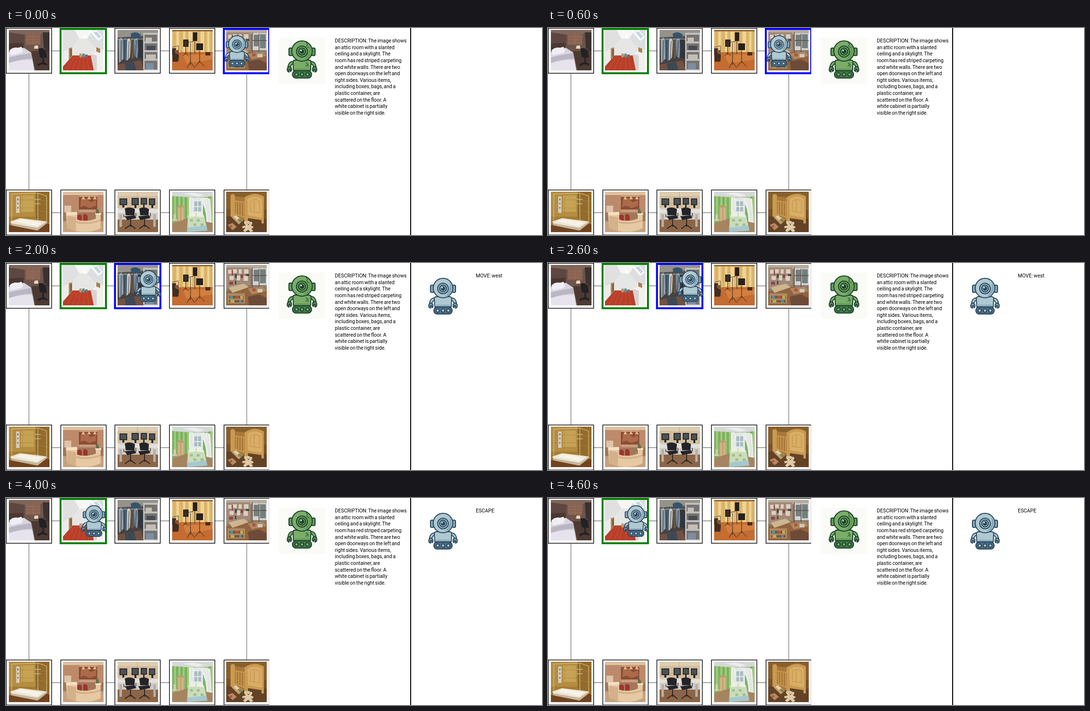
An HTML page for the animation above (5 s loop, 1110x430 px).

```html
<!DOCTYPE html>
<html lang="en">
<head>
<meta charset="utf-8">
<title>Room navigation</title>
<style>
  html, body { margin: 0; width: 100%; height: 100%; overflow: hidden; background: #fff; }
  svg { display: block; width: 1110px; height: 430px; }
  svg svg { width: 84px; height: 84px; }
  text { font: 10.4px Roboto, "Liberation Sans", sans-serif; word-spacing: -.9px; fill: #000; }
</style>
</head>
<body>
<svg id="stage" viewBox="0 0 1110 430"></svg>
<script>
const STEP = 1000;
const PITCH = 112.7;

// One shape per line: "color path" is a fill, "- color width path" is a line.
const ROOMS = {
  bedroom: `
#6d554b M0 0H84V84H0Z
#5d4740 M0 5L32 9V38H0Z
#80665a M0 0H84V7L34 10 0 5Z
#8a6352 M35 8H65V31H35Z
- #a07a69 .6 M35 14H65M35 20H65M35 26H65M50 8V31
#4a3731 M0 28L30 27V40L0 46Z
#3a3230 M70 5H84V48H73Z
#6f5142 M50 39H76V44H50Z
#4c3a32 M46 44H84V84H55Z
#222126 M61 39Q70 35 76 43L79 58 64 57ZM69 57H72L73 72H70ZM59 71L71 66 80 71 79 74 70 71 60 75Z
#d8d5de M0 46L31 37 46 47 53 84H0Z
#bbb6c4 M0 57Q26 51 46 48L48 60Q25 60 0 69Z
#f0eef4 M1 43Q8 35 19 37L26 35Q32 43 26 48L4 53Z
#e6e3ec M0 69Q25 61 49 63L52 84H0Z
#e8d9bc M53 33L60 32 61 39H52Z`,
  attic: `
#ececeb M0 0H84V84H0Z
#f6f6f5 M24 0H60L62 22 48 30 22 28Z
#e0e0e0 M0 0H24L34 18 18 36 0 45Z
#e6e6e4 M18 36L33 18H50L66 36V54H18Z
#dcdee0 M50 18L62 0H84V42L66 36Z
#f8fcff M57 4L70 0 82 15 73 23Z
#c6d6de M63 5L70 3 79 14 74 18Z
#b18a55 M12 38L19 36V54L12 62Z
#7d5a3b M15 40L18 39V54L15 57Z
#a9804f M69 36L77 39V50L69 48Z
#b93f29 M20 53H61L66 84H0V76Z
- #cc5b41 .8 M25 54L7 84M31 54L19 84M37 54L31 84M43 54L43 84M49 54L54 84
#f1f0ed M57 50L70 45 84 51V84H64Z
#d6d3d0 M57 50L70 53V84H64Z
#b79a75 M34 49H39V57H34Z
#5f9191 M40 49H45V57H40Z
#66737f M46 51H51V57H46Z
#fff M42 10H47V17H42Z`,
  closet: `
#5d5856 M0 0H84V84H0Z
#96918b M0 0H84V8L50 12 0 16Z
#46413f M0 16H54V84H0Z
#bfbfbb M53 6H84V84H53Z
#77736f M56 10H82V24H56ZM56 28H82V42H56ZM56 46H82V60H56ZM56 64H82V82H56Z
#34536d M27 8Q38 1 48 10L44 18 29 17Z
#93a1ac M2 20L8 16 13 24 12 60 3 69Z
#4a6376 M11 20L18 16 22 24 19 65 12 60Z
#cfcfcb M20 20L24 17 28 24 25 58 19 64Z
#6b5b4b M27 20L31 17 35 24 33 60 26 56Z
#7d91a4 M34 20L40 17 44 25 41 59 35 54Z
#31353e M42 20L48 17 53 25V61L43 57Z
- #2f2d2f 1 M8 22L7 64M15 22L14 61M24 23L22 60M31 22L29 57M39 22L37 55
- #cfcac2 1 M0 19H54
#c4beb6 M58 16H71V24H58ZM59 51H79V60H59Z
#484b52 M60 33H78V42H60Z
#7d8ea3 M59 69H75V82H59Z
#705142 M0 72L48 63 54 84H0Z
#3d4856 M15 70L34 66 39 84H17Z`,
  studio: `
#dfb970 M0 0H84V84H0Z
#efd595 M9 2H14V49H9ZM23 2H27V49H23ZM34 2H41V49H34ZM59 2H66V49H59ZM73 2H77V49H73Z
- #c59c54 .8 M5 3V47M19 3V47M31 3V48M55 3V48M69 3V48M81 3V48
#9a6534 M0 0H84V3H0Z
#c46c31 M0 48L22 46H84V84H0Z
#d27f40 M22 52L84 50V61L30 70Z
#28201c M43 5H52V23H43ZM23 20H34V35H23ZM50 28H64V42H50Z
#3a3028 M25 22H32V33H25Z
- #30241d 1 M28 35V51M47 23V50M57 43V69M38 27V73M32 26L44 24M48 76L57 65 67 76M31 79L38 66 47 79M22 54L28 48 34 54
#3e3027 M0 38H8V52H0ZM1 51Q9 45 14 53L12 66H1Z
#89532f M6 42H13V48H6Z
- #2b211b .8 M0 36L13 33M13 33V65
#4a2c1e M69 46H79V53H69Z`,
  playroom: `
#8f7a69 M0 0H84V84H0Z
#b8ab9c M0 0H84V7L52 9 0 5Z
#a18a78 M0 5H50V42L0 50Z
#cfd3d2 M54 7H84V42H54Z
#75807e M57 10H67V34H57ZM70 9H82V38H70Z
- #604b40 1.5 M54 5V48M68 8V47M84 22H55
#dccfc0 M4 10H11V18H4ZM14 9H22V17H14ZM26 9H32V18H26ZM37 9H46V18H37ZM7 23H16V31H7ZM22 22H29V32H22ZM36 23H45V33H36Z
#8d4742 M12 11H14V22H12ZM30 20H35V27H30ZM6 35H14V41H6Z
#414a52 M18 19H22V27H18ZM41 19H48V23H41ZM18 33H21V40H18Z
#92643f M0 55L43 45 84 51V84H0Z
#cdb68f M5 47L36 39 47 46 13 58Z
#ad8a60 M3 59H39V80H3ZM45 49L75 45 84 54 53 61Z
#6c5a4d M6 64H36V70H6ZM6 73H36V78H6Z
#5b8d95 M8 64H14V70H8ZM27 73H32V78H27Z
#b25342 M19 64H26V70H19ZM54 49H61V55H54Z
#c5aa49 M29 64H35V70H29ZM9 73H17V78H9Z
#6e4b38 M45 66L68 61 84 69V84H47Z
#d0c8ba M65 50H75V57H65Z`,
  shower: `
#a57c32 M0 0H84V84H0Z
#b58d40 M0 0H55V52H0Z
#956b28 M55 0H84V65L55 55Z
#c5a254 M25 8H52V42H25Z
- #ab8340 .7 M0 17H55M0 34H55M28 0V55M57 18L84 20M57 38L84 43
#d5cdbb M15 10H22V44H15Z
#898378 M17 14H20V18H17ZM17 23H20V26H17ZM17 32H20V35H17Z
- #d8cca5 1 M6 5V61M6 5L60 3M60 3V73M60 3L78 9M78 9V66
- #777053 .8 M58 4V72M64 5V70
#ece5d5 M3 62L23 55 79 62 59 78 6 69Z
#c4b69b M6 66L59 75 79 62V65L60 81 5 71Z
#f7f2e7 M13 62L25 57 69 64 58 72Z
#72431f M0 69L5 70 59 81 79 66 84 68V84H0Z
- #ded5bd 1 M53 16H66M53 25H66`,
  reception: `
#c79b7a M0 0H84V84H0Z
#dfc1a2 M0 0H84V7H0Z
#bd8a6b M0 7H34V43H0ZM71 7H84V55H71Z
#8a4d36 M33 11H71V37H33Z
#ad6a49 M37 17L48 14 58 22 68 17 69 29 55 34 44 29 36 32Z
#e3b78a M42 9L46 16H38ZM54 9L58 16H50ZM66 9L70 16H62Z
#dcc5a9 M3 29H17V44H3Z
#a2775a M0 43H84V61H0Z
#a0332e M30 49Q36 45 39 51V61H30ZM42 48Q48 44 51 51V60H42Z
#c8a17d M0 65H84V84H0Z
#e6c9a3 M6 45L29 44V58Q47 64 68 56V47H78V76Q56 87 28 82L9 76Z
#d3b18a M9 50L27 53V81L9 76ZM28 61Q50 67 78 58V61Q51 71 28 65Z
#f3e0c3 M6 43L29 42 30 48 8 49ZM67 44H79V48H67Z
#66704a M68 37Q70 31 74 39L75 45H68Z`,
  office: `
#d2bd9c M0 0H84V84H0Z
#decdb0 M0 0H84V9H0Z
- #b69e7a .8 M0 24H84M41 0V27
#8c6547 M0 56H84V84H0Z
#e4e0d9 M0 34L84 36V45H0Z
#d2cdc5 M0 44H84V58H0Z
#b5afa6 M4 47H9V73H4ZM74 47H79V73H74Z
#2b2c30 M4 14H20V28H4ZM29 13H44V28H29ZM48 13H61V27H48ZM65 14H78V28H65Z
#4d5256 M6 16H18V26H6ZM31 15H42V26H31ZM50 15H59V25H50ZM67 16H76V26H67Z
#292a2c M10 28H14V34H10ZM35 28H39V34H35ZM53 27H56V33H53ZM70 28H74V34H70Z
#d0cdc5 M3 33H22V37H3ZM52 34H71V37H52Z
#242428 M15 35Q25 30 36 36L35 49H17ZM15 51L35 49 39 55 20 59ZM45 35Q56 30 65 36L64 49H47ZM43 51L65 49 68 55 47 59Z
- #242326 1.8 M27 56V73M27 69L15 77M27 69L37 77M56 56V73M56 69L45 77M56 69L67 77
- #242326 1.2 M13 47V52H20M38 44V51H33M68 44V51H63`,
  green: `
#79b262 M0 0H84V84H0Z
#a3cb7b M4 8H8V59H4ZM13 8H17V58H13ZM22 8H26V56H22ZM31 8H35V55H31ZM71 8H75V63H71ZM80 8H84V67H80Z
#d5d9d7 M0 0H84V9L55 13 0 9Z
#ebeeeb M21 4L45 2 67 7 53 10Z
#e2e8e7 M37 13H64V48H37Z
#a9bcc0 M46 20H60V41H46Z
- #f4f6f6 1.4 M53 18V43M45 31H61
#ecedeb M35 12Q44 11 46 15Q45 35 35 47ZM57 14Q65 10 79 15L82 65 71 63Q71 34 57 14Z
- #cbd1cf .8 M40 14V38M66 15Q75 34 76 62M73 15L79 61
#bf9c6f M10 31Q17 25 25 31V66H10Z
#d2b284 M12 33H17V62H12ZM19 33H24V62H19Z
#a58560 M0 66L33 55 84 65V84H0Z
#cbdcbb M33 48Q47 41 66 49L72 76 31 81Z
#ecefe2 M36 45Q42 40 48 45L49 51 35 53ZM51 45Q58 41 64 47L66 53 51 52Z
#9bc28a M37 57H43V62H37ZM51 57H57V62H51ZM44 66H50V71H44ZM59 66H65V71H59Z
#a5c7cf M31 75L71 70 73 81 31 84Z
#d8c9ac M1 57H10V61H1ZM3 47H8V57H3Z`,
  nursery: `
#795329 M0 0H84V84H0Z
#87602f M0 0H84V37L42 42 0 35Z
#634325 M0 52L41 46 84 57V84H0Z
#a9793b M12 9L40 12V61L12 50Z
- #d1a356 1.4 M12 18L42 23M12 44L42 55M16 18V46M21 19V48M26 20V50M31 21V52M36 22V54
#c99a50 M9 7Q14 3 18 7V52H9ZM38 12Q58 -2 78 10V66H73V59L45 55V62H38Z
#d9ae66 M44 15Q59 5 74 15V54L45 49Z
- #b78444 .8 M50 20Q59 12 69 20V44L50 41ZM58 17V42
#c49f67 M11 53L20 48 35 60 26 68Z
#dfceb0 M15 52L20 49 27 55 22 59Z
#7d8458 M24 58L29 56 34 61 29 64Z
#b98763 M3 69L13 65 22 73 13 80Z
#a5523a M8 70H12V74H8Z
#e0caa6 M37 63Q38 59 41 62Q46 59 50 63Q54 61 54 66Q53 69 51 70L57 73 54 77 51 75 56 82 50 84 46 79 39 84 35 81 40 75 34 76 33 72 41 70Q37 67 37 63Z
#4b3324 M43 65H44V66H43ZM48 65H49V66H48ZM45 67H47V69H45Z`
};
const GRID = [
  ["bedroom", "attic", "closet", "studio", "playroom"],
  ["shower", "reception", "office", "green", "nursery"]
];
const DESCRIPTION = [
  "DESCRIPTION: The image shows", "an attic room with a slanted", "ceiling and a skylight. The",
  "room has red striped carpeting", "and white walls. There are two", "open doorways on the left and",
  "right sides. Various items,", "including boxes, bags, and a", "plastic container, are",
  "scattered on the floor. A", "white cabinet is partially", "visible on the right side."
];
const BLUE = { line: "#2a475e", light: "#afc9d2", mid: "#86a8b8", dark: "#4f6f85" };
const GREEN = { line: "#1b432c", light: "#7aad68", mid: "#659a58", dark: "#447a4a" };

const rect = (x, y, w, h, attrs) => `<rect x="${x}" y="${y}" width="${w}" height="${h}" ${attrs}/>`;
const circle = (x, y, r, attrs) => `<circle cx="${x}" cy="${y}" r="${r}" ${attrs}/>`;
const path = (d, attrs) => `<path d="${d}" ${attrs}/>`;
const label = (x, y, s, attrs = "") => `<text x="${x}" y="${y}" ${attrs}>${s}</text>`;

function shape(line) {
  const [, stroke, color, width, d] = line.match(/^(- )?(#\w+) (?:([\d.]+) )?(M.*)$/);
  return path(d, stroke ? `fill="none" stroke="${color}" stroke-width="${width}"` : `fill="${color}"`);
}

function card(name, col, row) {
  const x = col * PITCH, y = row * 336;
  const art = ROOMS[name].trim().split("\n").map(shape).join("");
  return rect(Math.round(x) + .5, y + .5, 94, 93.5, 'fill="#fff" stroke="#000" stroke-width="1.4"') +
    `<svg x="${Math.round(x + 5.6)}" y="${y + 4}" width="84" height="84">${art}</svg>`;
}

// Drawn around the middle of the head.
function robot(c, marks = "") {
  const edge = `stroke="${c.line}" stroke-width="2" stroke-linejoin="round"`;
  const arm = "M17 20Q24 20 25.5 29";
  const side = s => `<g transform="scale(${s} 1)">` +
    rect(19, -9, 7, 15, `rx="2.5" fill="${c.mid}" ${edge}`) +
    path(arm, `fill="none" stroke="${c.line}" stroke-width="7" stroke-linecap="round"`) +
    path(arm, `fill="none" stroke="${c.light}" stroke-width="3.4" stroke-linecap="round"`) +
    path("M21 36Q20 29 25 28Q31 30 29 37L26 39 26 34 24 33 23 38Z", `fill="${c.mid}" ${edge}`) +
    "</g>";
  return side(-1) + side(1) +
    path("M-14 15H14Q18 15 18 20L17 36H-17L-18 20Q-18 15 -14 15Z", `fill="${c.light}" ${edge}`) +
    path("M-14 33H14", `stroke="${c.mid}" stroke-width="2.4"`) +
    circle(0, -3, 20.3, `fill="${c.light}" ${edge}`) +
    path("M13 -17Q22 -5 14 9Q9 14 2 15Q17 6 13 -17Z", `fill="${c.mid}"`) +
    circle(0, -2, 11, `fill="${c.light}" ${edge}`) +
    circle(0, -2, 7.2, `fill="${c.mid}" ${edge}`) +
    circle(0, -2, 4.4, `fill="${c.line}"`) +
    circle(-1.8, -4, 1.6, 'fill="#e5f0e9"') +
    rect(-19, 36.5, 38, 14.5, `rx="7" fill="${c.dark}" ${edge}`) +
    [-11, 0, 11].map(x => circle(x, 43.8, 3.4, `fill="${c.light}" ${edge}`)).join("") + marks;
}

const crack = path("M8 -21L11 -16 9 -13 14 -9M7 21H10V25L7 28M12 22V29",
  `fill="none" stroke="${GREEN.line}" stroke-width="1"`);
const links = [0, 1, 2, 3].map(i => `M${i * PITCH + 95} 47.5h18m-18 336h18`).join("") + "M47.5 95V336M498.5 95V336";

const stage = document.getElementById("stage");
stage.innerHTML =
  '<clipPath id="map"><rect width="545" height="430"/></clipPath><g clip-path="url(#map)">' +
  path(links, 'stroke="#808080" stroke-width="1.4"') +
  GRID.map((row, r) => row.map((name, c) => card(name, c, r)).join("")).join("") +
  rect(0, 2, 94, 92, 'id="here" fill="none" stroke="#00f" stroke-width="4"') +
  rect(113, 2, 94, 92, 'fill="none" stroke="#008000" stroke-width="4"') +
  `<g id="walker">${robot(BLUE)}</g></g>` +
  rect(565, 20, 96, 96, 'fill="#fafbf6"') +
  `<g transform="translate(613 51) scale(1.04)">${robot(GREEN, crack)}</g>` +
  DESCRIPTION.map((s, i) => label(681, 30 + i * 13.64, s)).join("") +
  rect(837, 0, 2, 430, 'fill="#000"') +
  `<g id="speaker"><g transform="translate(905 55)">${robot(BLUE)}</g>${label(973, 30, "", 'id="action"')}</g>`;

const [here, walker, speaker, action] =
  ["here", "walker", "speaker", "action"].map(id => document.getElementById(id));

function draw(time) {
  const step = Math.floor(time / STEP) % 5;
  const col = Math.max(1, 4 - step);
  here.setAttribute("x", col * PITCH + .3);
  walker.setAttribute("transform", `translate(${col * PITCH + 47.5 + (step ? 22 : -20)} 36) scale(.86)`);
  speaker.setAttribute("visibility", step ? "visible" : "hidden");
  action.textContent = step === 4 ? "ESCAPE" : "MOVE: west";
}

const start = performance.now();
function tick() {
  draw(performance.now() - start);
  requestAnimationFrame(tick);
}
tick();
</script>
</body>
</html>
```
